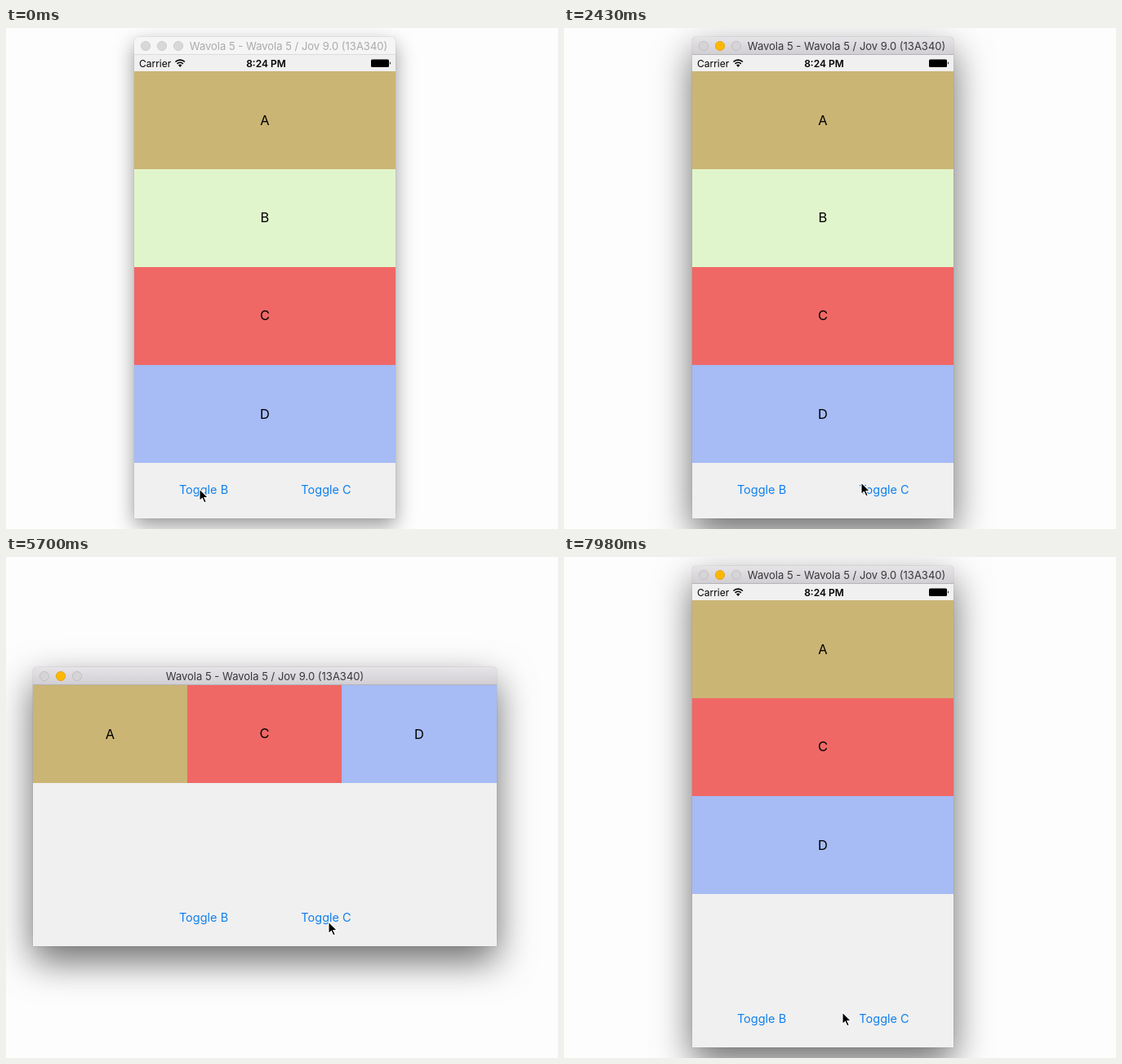
An HTML page that plays this animation: 676 by 614 pixels, repeating every 8000 ms.

```html
<!DOCTYPE html>
<html lang="en">
<head>
<meta charset="utf-8">
<title>Stack toggles</title>
<style>
html, body { margin: 0; width: 100%; height: 100%; overflow: hidden; background: #fdfdfe; }
#stage { position: relative; width: 676px; height: 614px; overflow: hidden; }
.layer { position: absolute; inset: 0; transform-origin: 317px 317px; }
.layer > svg, #pointer { position: absolute; left: 0; top: 0; }
.frame {
  position: absolute; border-radius: 5px 5px 0 0; background: #f0f0f0;
  box-shadow: 0 0 1px rgba(0, 0, 0, .5), 0 18px 45px rgba(0, 0, 0, .58);
}
.idle .frame { box-shadow: 0 0 1px rgba(0, 0, 0, .4), 0 9px 24px rgba(0, 0, 0, .4); }
.bar { position: absolute; inset: 0 0 auto; height: 22px; border-radius: inherit;
  background: linear-gradient(#e6e4e7, #d0ced2); box-shadow: inset 0 -1px #b6b4b8; }
.idle .bar { background: #f5f5f5; box-shadow: inset 0 -1px #dcdcdc; }
text { font-family: Inter, "Open Sans", sans-serif; text-anchor: middle; }
.title { font-size: 13px; fill: #38363a; }
.light { fill: #d6d4d7; stroke: #bcbabd; stroke-width: .8; }
.light.mid { fill: #ffb800; stroke: #e09e10; }
.idle .title { fill: #aaa; }
.idle .light { fill: #d8d8d8; stroke: #c8c8c8; }
.label { font-size: 16.5px; }
.button { font-size: 14.5px; fill: #1080ee; }
.status { font-size: 12px; }
</style>
</head>
<body>
<div id="stage"></div>
<script>
const LOOP = 8000;
const stage = document.getElementById('stage');

// Name, colour and label baseline below the middle.
const panels = [['A', '#cbb575', 6], ['B', '#e1f5cc', 5], ['C', '#ef6866', 5], ['D', '#a7bbf4', 6]];

const portrait = { x: 157, y: 11, w: 320, h: 590, titleX: 346, buttonY: 571 };
const landscape = { x: 33, y: 135, w: 568, h: 342, titleX: 317, buttonY: 447 };

const statusBar = `
  <text class="status" x="163" y="47.5" style="text-anchor:start">Carrier</text>
  <g fill="none" stroke="#000" stroke-width="1.7">
    <path d="M207.5 41.5a8 8 0 0 1 11.4 0M209.6 43.8a5 5 0 0 1 7.2 0"/>
  </g>
  <path d="M211 45.6a3.2 3.2 0 0 1 4.4 0L213.2 48z"/>
  <text class="status" x="318.5" y="47.5" font-weight="600">8:24 PM</text>
  <rect x="447" y="38.5" width="22" height="9.5" rx="1.5"/>
  <path d="M470 41.2q2 1.8 0 3.6z"/>`;

function buildWindow(box, extra) {
  const layer = document.createElement('div');
  layer.className = 'layer';
  const lights = [14, 34, 54].map((dx, i) =>
    `<circle class="light${i === 1 ? ' mid' : ''}" cx="${box.x + dx}" cy="${box.y + 11}" r="5.6"/>`).join('');
  const cells = panels.map(([name, color, dy]) => `<svg class="cell"><rect width="100%" height="100%" fill="${color}"/>
    <text class="label" x="50%" y="50%" dy="${dy}">${name}</text></svg>`).join('');
  layer.innerHTML = `
    <div class="frame" style="left:${box.x}px;top:${box.y}px;width:${box.w}px;height:${box.h}px"><div class="bar"></div></div>
    <svg width="676" height="614">${lights}
      <text class="title" x="${box.titleX}" y="${box.y + 16}">Wavola 5 - Wavola 5 / Jov 9.0 (13A340)</text>
      ${extra}${cells}
      <text class="button" x="242" y="${box.buttonY}">Toggle B</text>
      <text class="button" x="392" y="${box.buttonY}">Toggle C</text>
    </svg>`;
  stage.append(layer);
  return { layer, cells: [...layer.querySelectorAll('.cell')] };
}

const tall = buildWindow(portrait, statusBar);
const wide = buildWindow(landscape, '');
stage.insertAdjacentHTML('beforeend', `<svg id="pointer" width="20" height="24" overflow="visible">
  <path d="M0 0V14.5L3.4 11.4L5.8 16.8L8.3 15.7L5.9 10.5H10.5Z" stroke="#fff" stroke-width="1.1"/></svg>`);
const pointer = document.getElementById('pointer');

const ease = p => p * p * (3 - 2 * p);

// Rows of [time, ...values], eased from one row to the next.
function track(keys, t) {
  const next = keys.findIndex(k => k[0] > t);
  if (next < 0) return keys[keys.length - 1].slice(1);
  const from = keys[Math.max(next - 1, 0)], to = keys[next];
  const p = ease(Math.max(0, (t - from[0]) / (to[0] - from[0])));
  return from.slice(1).map((v, i) => v + (to[i + 1] - v) * p);
}

// Each time flips a panel between shown and hidden.
const toggles = (...times) => times.flatMap((time, i) =>
  [[time, (i + 1) % 2], [time + 250, i % 2]]);

const activeAt = 400;
const showB = toggles(1050, 1400, 3640);
const showC = toggles(1830, 2120, 4880, 5300);
const turn = [[2620, 0], [3120, 1], [5880, 1], [6380, 0]];
const pointerPath = [
  [0, 237, 565], [1500, 237, 565], [1760, 388, 567], [2250, 388, 567], [2430, 364, 557],
  [2620, 350, 545], [3200, 340, 520], [3560, 267, 440], [4300, 267, 440], [4700, 395, 447],
  [5750, 395, 447], [6300, 387, 470], [6550, 387, 470], [7980, 341, 558]
];

function place(cell, x, y, width, height) {
  for (const [key, value] of Object.entries({ x, y, width, height })) cell.setAttribute(key, value);
  cell.style.display = width > .01 && height > .01 ? '' : 'none';
}

function layout(shares) {
  const total = shares.reduce((a, b) => a + b);
  let x = landscape.x, y = 53;
  shares.forEach((share, i) => {
    const right = x + landscape.w * share / total, height = 120 * share;
    const left = Math.floor(x + .01);
    place(wide.cells[i], left, 157, Math.floor(right + .01) - left, 120);
    place(tall.cells[i], 157, y, 320, height);
    x = right;
    y += height;
  });
}

function pose({ layer }, angle, opacity) {
  layer.style.transform = angle ? `rotate(${angle}deg)` : 'none';
  layer.style.opacity = opacity;
  layer.style.visibility = opacity > 0 ? 'visible' : 'hidden';
}

function draw() {
  const t = performance.now() % LOOP;
  tall.layer.classList.toggle('idle', t < activeAt);
  layout([1, track(showB, t)[0], track(showC, t)[0], 1]);
  const [p] = track(turn, t);
  pose(tall, -90 * p, Math.min(1, 2 - 2 * p));
  pose(wide, 90 - 90 * p, Math.min(1, 2 * p));
  const [x, y] = track(pointerPath, t);
  pointer.style.transform = `translate(${x}px, ${y}px)`;
  requestAnimationFrame(draw);
}
draw();
</script>
</body>
</html>
```
